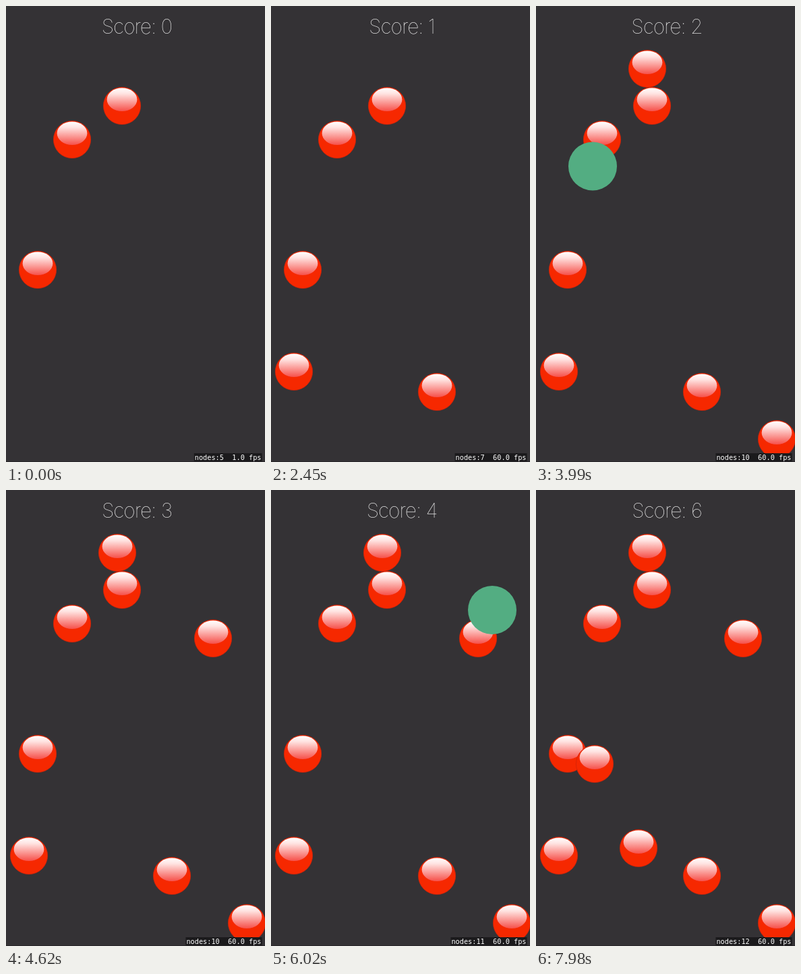
Animation of 384x676 px, one loop 8 s. Source, as an HTML page:

```html
<!DOCTYPE html>
<html lang="en">
<head>
<meta charset="utf-8">
<title>Score</title>
<style>
  html, body { margin: 0; width: 100%; height: 100%; overflow: hidden; background: #343235; }
  svg { display: block; width: 100vw; height: 100vh; }
  #score { font: 100 30px Inter, "Helvetica Neue", sans-serif; letter-spacing: -1px; fill: #f2f2f2; }
  #stats { font: 10.25px "DejaVu Sans Mono", monospace; fill: #fff; white-space: pre; }
</style>
</head>
<body>
<svg viewBox="0 0 384 676">
  <defs>
    <linearGradient id="shine" x1="0" y1="0" x2="0" y2="1">
      <stop offset="0" stop-color="#fff"/>
      <stop offset=".25" stop-color="#ffe3e1"/>
      <stop offset="1" stop-color="#f6504a"/>
    </linearGradient>
    <g id="red">
      <circle r="27.6" fill="#f62800" stroke="#d32408" stroke-width=".8"/>
      <ellipse cy="-9.3" rx="22.4" ry="17.3" fill="url(#shine)"/>
    </g>
    <circle id="green" r="36" fill="#53ad82"/>
  </defs>
  <rect width="384" height="676" fill="#343235"/>
  <rect y="675" width="384" height="1" fill="#29272a"/>
  <text id="score" x="194" y="41" text-anchor="middle"></text>
  <g id="balls"></g>
  <rect id="plate" y="663" height="12" fill="#1b1a1c"/>
  <text id="stats" x="378.5" y="673" text-anchor="end"></text>
</svg>
<script>
const LOOP = 8000;
const $ = id => document.getElementById(id);

// x, y, time of appearance
const reds = [
  [172, 148, 0], [98, 198, 0], [47, 391, 0],
  [246, 572, 70], [34, 542, 1890], [357, 642, 2520],
  [165, 93, 3850], [307, 220, 4480],
  [152, 531, 6370], [87, 406, 6790]
];
// x, y, time of appearance, time of the scoring tap
const greens = [
  [136, 116, 1050, 1400], [191, 376, 2940, 3710], [84, 237.5, 3360, 4200],
  [230, 330, 5110, 5600], [328, 178, 5810, 6440], [250, 420, 7280, 7770]
];
// time, frames per second shown
const rates = [[0, "1.0"], [70, "60.9"], [1890, "60.0"]];

function add(kind, [x, y, from, to = LOOP]) {
  const el = document.createElementNS("http://www.w3.org/2000/svg", "use");
  el.setAttribute("href", "#" + kind);
  el.setAttribute("x", x);
  el.setAttribute("y", y);
  $("balls").append(el);
  return { el, from, to };
}

const items = [
  ...reds.map(r => add("red", r)),
  ...greens.map(g => add("green", g))
];

function setText(el, text) {
  if (el.textContent !== text) el.textContent = text;
}

function draw(t) {
  let nodes = 2;
  for (const { el, from, to } of items) {
    const on = t >= from && t < to;
    el.style.display = on ? "" : "none";
    nodes += on;
  }
  const points = greens.filter(g => t >= g[3]).length;
  const rate = rates.filter(r => t >= r[0]).pop()[1];
  const stats = `nodes:${nodes}  ${rate} fps`;
  setText($("score"), "Score: " + points);
  setText($("stats"), stats);
  const width = stats.length * 6.17 + 2;
  $("plate").setAttribute("x", 379.5 - width);
  $("plate").setAttribute("width", width);
}

const start = performance.now();
function tick() {
  draw((performance.now() - start) % LOOP);
  requestAnimationFrame(tick);
}
tick();
</script>
</body>
</html>
```
